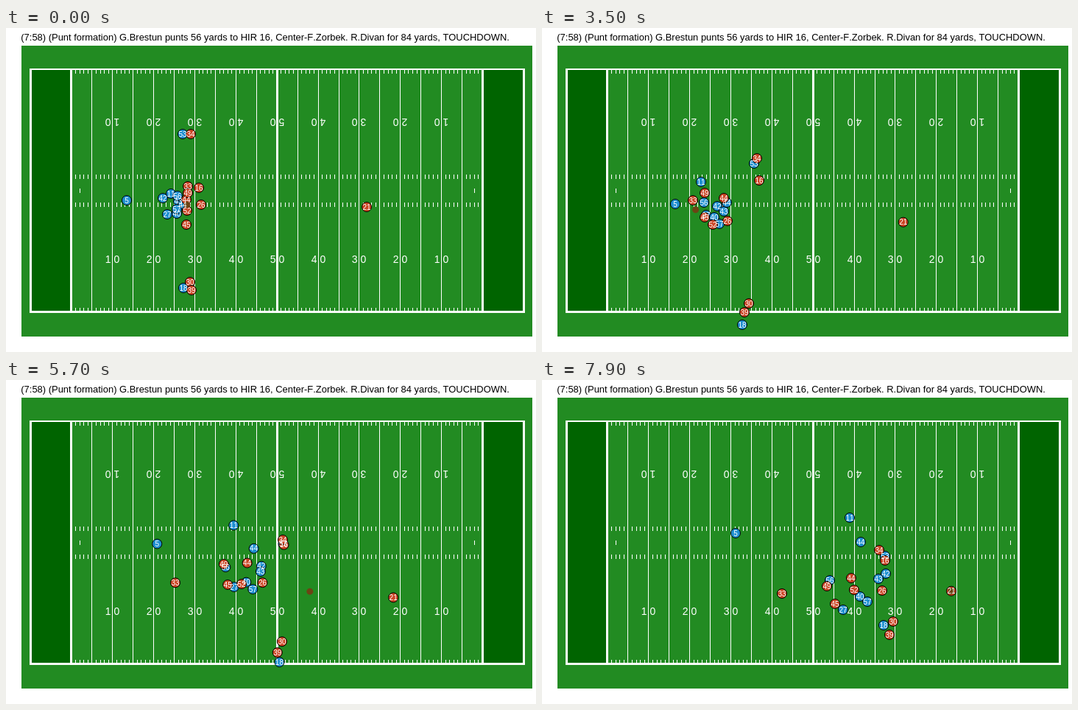
These frames come from a looping animation (720x440 px, 8000 ms). An HTML page:

```html
<!DOCTYPE html>
<html lang="en">
<head>
<meta charset="utf-8">
<title>Punt return</title>
<style>
  html, body { margin: 0; width: 720px; height: 440px; overflow: hidden; background: #fff; }
  svg { display: block; font-family: "Liberation Sans", Arial, sans-serif; font-kerning: none; }
  #lines { fill: #fff; shape-rendering: crispEdges; }
  #yards { fill: #fff; font-size: 14px; text-anchor: middle; }
  #dots circle { stroke: #000; stroke-width: 1; }
  #numbers { fill: #fff; font-size: 10px; text-anchor: middle; }
</style>
</head>
<body>
<svg width="720" height="440" viewBox="0 0 720 440">
  <text x="20.3" y="17" font-size="12.95">(7:58) (Punt formation) G.Brestun punts 56 yards to HIR 16, Center-F.Zorbek. R.Divan for 84 yards, TOUCHDOWN.</text>
  <rect x="21" y="24" width="694" height="395" fill="#228b22"/>
  <rect x="33" y="56" width="55" height="330" fill="#006400"/>
  <rect x="648" y="56" width="56" height="330" fill="#006400"/>
  <g id="lines"></g>
  <g id="yards"></g>
  <g id="dots"></g>
  <circle id="ball" r="4.5" fill="#6b4414"/>
  <g id="numbers"></g>
</svg>
<script>
const LOOP = 8000, STEP = 100;
const BLUE = '#1e8fd0', RED = '#cb4423';
const SNAP = 1800, TURN = 3500, CHASE = 4900, END = 7900;
const KICK = 3230, CATCH = 7400;
const byId = id => document.getElementById(id);

function add(parent, tag, attrs, text) {
  const el = document.createElementNS('http://www.w3.org/2000/svg', tag);
  for (const key in attrs) el.setAttribute(key, attrs[key]);
  if (text) el.textContent = text;
  return byId(parent).appendChild(el);
}

// Field markings
const line = (x, y, width, height) => add('lines', 'rect', { x, y, width, height });
const yardX = yard => Math.round(88.49 + 5.585 * yard);

for (let yard = 1; yard < 100; yard++) {
  const x = yardX(yard);
  if (yard % 5 === 0) line(x, 56, 1, 330);
  for (const y of [57, 380]) line(x, y, 1, 5);
  for (const y of [199, 237]) line(x, y, 1, 6);
}
for (const yard of [0, 50, 100]) line(yardX(yard) - 1, 56, 3, 330);
for (const x of [100, 636]) line(x, 218, 1, 6);
for (const x of [32, 702]) line(x, 55, 3, 332);
line(32, 55, 673, 2);
line(32, 384, 673, 3);

for (let yard = 10; yard < 100; yard += 10) {
  const x = yardX(yard) + 0.5;
  const label = Math.min(yard, 100 - yard) / 10 + ' 0';
  add('yards', 'text', { x, y: 319 }, label);
  add('yards', 'text', { x, y: 319, transform: `rotate(180 ${x} 221)` }, label);
}

// Motion helpers
const ramp = (t, from, to) => Math.min(1, Math.max(0, (t - from) / (to - from)));
const lerp = (a, b, u) => a.map((v, k) => v + (b[k] - v) * u);
const smooth = u => u * u * (3 - 2 * u);

// Cubic through the values; at rest at the first one.
function spline(times, v, t) {
  const last = v.length - 1;
  const slope = i => {
    if (i === 0) return 0;
    const j = Math.min(i + 1, last);
    return (v[j] - v[i - 1]) / (times[j] - times[i - 1]);
  };
  let i = 0;
  while (i < last - 1 && t >= times[i + 1]) i++;
  const span = times[i + 1] - times[i];
  const u = ramp(t, times[i], times[i + 1]);
  const bend = slope(i) * (1 - u) * (1 - u) * u - slope(i + 1) * (1 - u) * u * u;
  return v[i] + (v[i + 1] - v[i]) * smooth(u) + span * bend;
}

// Waypoints: line-up, turn upfield, optional chase point, finish.
function route(...points) {
  const times = points.length === 3 ? [SNAP, TURN, END] : [SNAP, TURN, CHASE, END];
  return t => [0, 1].map(axis => spline(times, points.map(p => p[axis]), t));
}

const players = [];

function player(fill, number, at) {
  players.push({
    at,
    dot: add('dots', 'circle', { r: 6.5, fill }),
    label: add('numbers', 'text', {}, String(number)),
  });
}

const blue = (number, ...points) => player(BLUE, number, route(...points));
const red = (number, ...points) => player(RED, number, route(...points));

blue(5, [164, 234], [181, 239], [188, 228], [263, 208]);
blue(11, [224, 225], [216, 209], [418, 187]);
blue(18, [241, 353], [272, 403], [337, 398], [464, 333]);
blue(27, [219, 253], [223, 254], [409, 312]);
blue(40, [232, 252], [234, 257], [432, 294]);
blue(42, [213, 231], [238, 242], [467, 263]);
blue(43, [234, 235], [247, 249], [457, 270]);
blue(44, [240, 240], [251, 237], [433, 220]);
blue(53, [240, 144], [288, 184], [344, 214], [466, 239]);
blue(56, [233, 228], [220, 237], [391, 272]);
blue(57, [232, 246], [241, 266], [442, 301]);

red(16, [262, 217], [295, 207], [466, 245]);
red(26, [265, 240], [252, 262], [462, 286]);
red(30, [250, 345], [281, 374], [477, 328]);
red(33, [247, 215], [205, 234], [203, 267], [326, 290]);
red(34, [251, 144], [292, 177], [346, 209], [458, 231]);
red(39, [252, 356], [275, 386], [472, 346]);
red(44, [245, 233], [247, 231], [420, 269]);
red(45, [245, 267], [221, 257], [398, 304]);
red(49, [247, 224], [221, 224], [387, 280]);
red(52, [246, 248], [232, 267], [424, 285]);

// The returner drifts back and across under the kick.
function returner(t) {
  const swing = Math.PI * Math.max(0, t - 1400) / 5000;
  return [490 + 66 * smooth(ramp(t, 3200, END)), 270.5 - 27.5 * Math.cos(swing)];
}
player(RED, 21, returner);

function ballAt(t) {
  const hands = [175, 237], foot = [182, 239];
  if (t < 2600) return lerp([246, 240], hands, ramp(t, 1850, 2600));
  if (t < KICK) return lerp(hands, foot, ramp(t, 2600, KICK));
  if (t >= CATCH) return returner(t);
  const u = ramp(t, KICK, CATCH);
  return [foot[0] + 414 * u - 41 * u * u, foot[1] + 124 * u - 72 * u * u];
}

function place(el, x, y) {
  el.setAttribute('transform', `translate(${x.toFixed(2)} ${y.toFixed(2)})`);
}

function draw(t) {
  for (const { at, dot, label } of players) {
    const [x, y] = at(t);
    place(dot, x, y);
    place(label, x, y + 3.6);
  }
  place(byId('ball'), ...ballAt(t));
}

const start = performance.now();

function tick() {
  const t = (performance.now() - start) % LOOP;
  draw(Math.floor(t / STEP) * STEP);
  requestAnimationFrame(tick);
}
tick();
</script>
</body>
</html>
```
